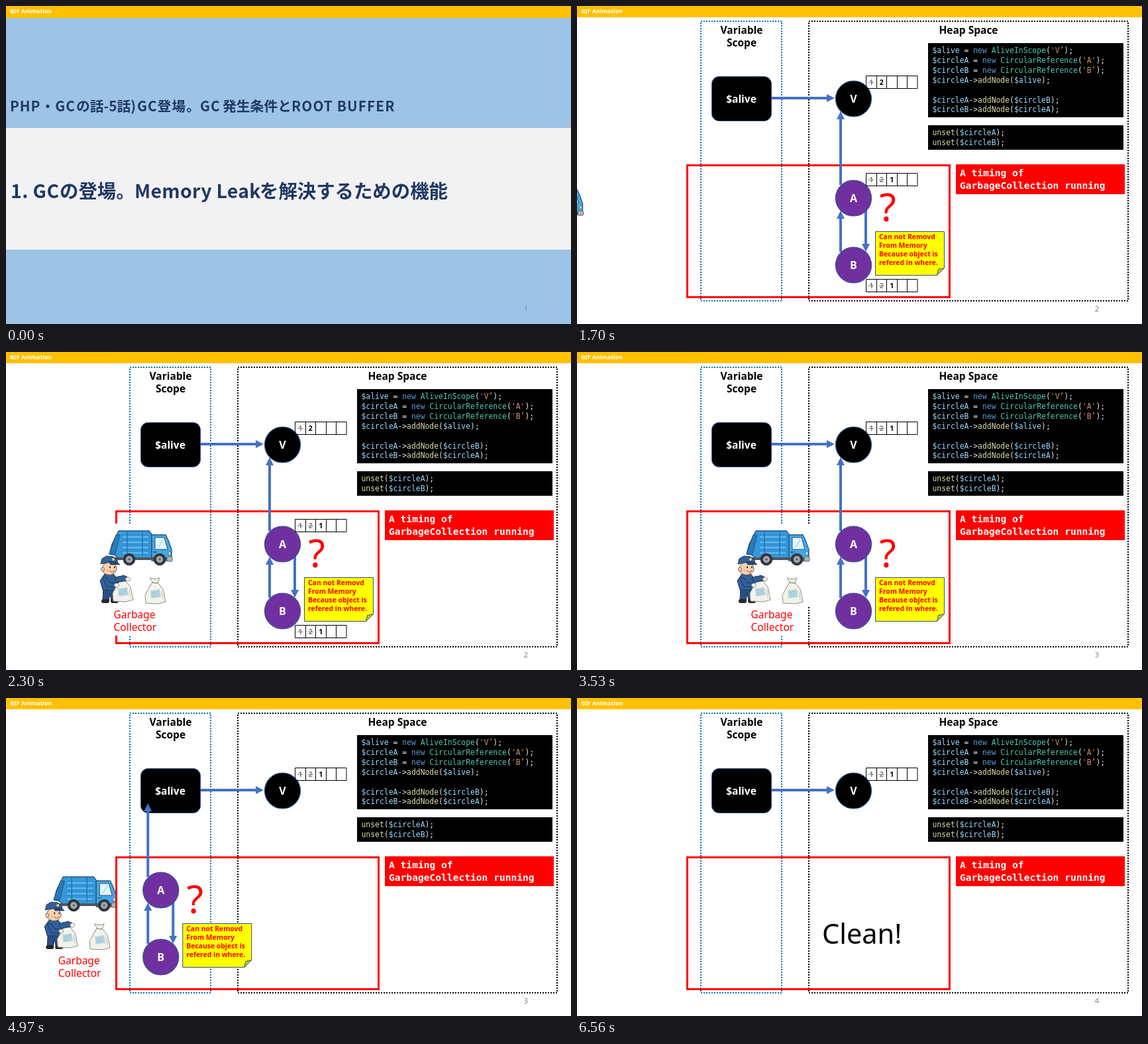
An HTML page with a canvas that plays this animation: 853x480 px, repeating every 8 s.

```html
<!DOCTYPE html>
<html lang="ja">
<head>
<meta charset="utf-8">
<title>GC Animation</title>
<style>
  html, body { margin: 0; width: 100%; height: 100%; overflow: hidden; background: #fff; }
  canvas { display: block; width: 853px; height: 480px; }
</style>
</head>
<body>
<canvas id="stage" width="853" height="480"></canvas>
<script>
const ctx = document.getElementById('stage').getContext('2d');
const SANS = '"Noto Sans", "Open Sans", sans-serif';
const CJK = '"Noto Sans CJK JP", "Noto Sans CJK", sans-serif';
const MONO = '"DejaVu Sans Mono", monospace';
const LOOP = 8000, STEP = 60;
const BLUE = '#4472c4', EDGE = '#2f528f', RED = '#ff0000', PURPLE = '#7030a0', NAVY = '#1f3864';

function text(str, x, y, font, color, align = 'left') {
  ctx.font = font;
  ctx.fillStyle = color;
  ctx.textAlign = align;
  ctx.fillText(str, x, y);
}

function rect(x, y, w, h, color) {
  ctx.fillStyle = color;
  ctx.fillRect(x, y, w, h);
}

function paint(fill, stroke, width = 1) {
  if (fill) { ctx.fillStyle = fill; ctx.fill(); }
  if (stroke) { ctx.strokeStyle = stroke; ctx.lineWidth = width; ctx.stroke(); }
}

function poly(points, fill, stroke, width) {
  ctx.beginPath();
  points.forEach(([x, y]) => ctx.lineTo(x, y));
  ctx.closePath();
  paint(fill, stroke, width);
}

function oval(x, y, rx, ry, fill, stroke, width) {
  ctx.beginPath();
  ctx.ellipse(x, y, rx, ry, 0, 0, Math.PI * 2);
  paint(fill, stroke, width);
}

function rounded(x, y, w, h, r, fill, stroke, width) {
  ctx.beginPath();
  ctx.roundRect(x, y, w, h, r);
  paint(fill, stroke, width);
}

function line(x1, y1, x2, y2, color, width) {
  ctx.beginPath();
  ctx.moveTo(x1, y1);
  ctx.lineTo(x2, y2);
  paint(null, color, width);
}

function dotted(x, y, w, h, color) {
  ctx.setLineDash([2, 2]);
  ctx.strokeStyle = color;
  ctx.lineWidth = 2;
  ctx.strokeRect(x, y, w, h);
  ctx.setLineDash([]);
}

function arrow(x1, y1, x2, y2) {
  const len = Math.hypot(x2 - x1, y2 - y1);
  ctx.save();
  ctx.translate(x1, y1);
  ctx.rotate(Math.atan2(y2 - y1, x2 - x1));
  line(0, 0, len - 10, 0, BLUE, 4);
  poly([[len - 12, -6], [len, 0], [len - 12, 6]], BLUE);
  ctx.restore();
}

function node(label, x, y, color) {
  oval(x, y, 27, 27, color, EDGE, 1.2);
  text(label, x, y + 6, `bold 16px ${SANS}`, '#fff', 'center');
}

// Five cells of reference counts; only the last value is current.
function counts(y, values) {
  const x = 436.5, cell = 15.5;
  ctx.beginPath();
  ctx.rect(x, y + 0.5, cell * 5, 19);
  for (let i = 1; i < 5; i++) {
    const cx = Math.floor(x + cell * i) + 0.5;
    ctx.moveTo(cx, y + 0.5);
    ctx.lineTo(cx, y + 19.5);
  }
  paint(null, '#000', 1);
  values.forEach((v, i) => {
    const old = i < values.length - 1, cx = x + cell * (i + 0.5);
    text(v, cx, y + 14, `bold 10.5px ${SANS}`, old ? '#7f7f7f' : '#000', 'center');
    if (old) line(cx - 4, y + 10.5, cx + 4, y + 10.5, '#7f7f7f', 1);
  });
}

const TOKEN = /(\$\w+)|(new\b)|('.['’])|([A-Z]\w+)|(\w+)|(.)/g;
const TOKEN_COLORS = ['#9cdcfe', '#569cd6', '#ce9178', '#4ec9b0', '#dcdcaa', '#e6e6e6'];

function code(lines, x, y) {
  ctx.font = `11.4px ${MONO}`;
  const advance = ctx.measureText('0').width;
  lines.forEach((src, row) => {
    for (const m of src.matchAll(TOKEN)) {
      const kind = m.slice(1).findIndex(Boolean);
      text(m[0], x + m.index * advance, y + row * 14.9, `11.4px ${MONO}`, TOKEN_COLORS[kind]);
    }
  });
}

function titleSlide() {
  rect(0, 0, 853, 480, '#9dc3e6');
  rect(0, 184, 853, 184, '#f2f2f2');
  rect(0, 368, 853, 1, '#8fb6da');
  const runs = (list, y, size) => list.forEach(([str, x, spacing = 0]) => {
    ctx.letterSpacing = spacing + 'px';
    text(str, x, y, `bold ${size}px ${CJK}`, NAVY);
  });
  runs([['PHP・GC', 6, 1], ['の話-5話)', 106], ['GC登場。', 198, 1], ['GC', 293, 1],
    ['発生条件と', 327], ['ROOT BUFFER', 431, 1.1]], 159, 20.8);
  runs([['1. GC', 7, 0.4], ['の登場。', 81], ['Memory Leak', 194, 0.3],
    ['を解決するための機能', 383]], 290, 28.4);
  ctx.letterSpacing = '0px';
  text('1', 785, 461, `10.5px ${SANS}`, '#6f8fb0', 'center');
}

function header(height) {
  rect(0, 0, 853, height, '#ffc000');
  text('GIF Animation', 6, 11, `bold 8.8px ${SANS}`, '#fff');
}

function diagram(page) {
  const heading = `bold 15.5px ${SANS}`;
  dotted(187, 23, 122, 422, '#0070c0');
  dotted(350, 23, 482, 422, '#000');
  text('Variable', 248.5, 42, heading, '#000', 'center');
  text('Scope', 248.5, 61, heading, '#000', 'center');
  text('Heap Space', 591, 42, heading, '#000', 'center');
  rect(530, 56, 295, 112, '#000');
  code(["$alive = new AliveInScope('V’);", "$circleA = new CircularReference('A');",
    "$circleB = new CircularReference('B’);", '$circleA->addNode($alive);', '',
    '$circleA->addNode($circleB);', '$circleB->addNode($circleA);'], 536.5, 71);
  rect(530, 180, 295, 37, '#000');
  code(['unset($circleA);', 'unset($circleB);'], 536.5, 195);
  rect(572, 239, 255, 45, RED);
  text('A timing of', 578, 257, `bold 14.6px ${MONO}`, '#fff');
  text('GarbageCollection running', 578, 276, `bold 14.6px ${MONO}`, '#fff');
  rounded(203.5, 106.5, 90, 67, 11, '#000', EDGE);
  text('$alive', 248, 146, heading, '#fff', 'center');
  node('V', 417.5, 140, '#000');
  arrow(294, 139, 389, 139);
  counts(105, page === 2 ? ['1', '2'] : ['1', '2', '1']);
  text(page, 785, 461, `11px ${SANS}`, '#7f7f7f', 'center');
}

function redFrame() {
  ctx.strokeStyle = RED;
  ctx.lineWidth = 3;
  ctx.strokeRect(166.5, 240.5, 396, 199);
}

function cycle() {
  arrow(398, 270, 398, 159);
  arrow(398, 371, 398, 309);
  arrow(436, 307, 436, 371);
  node('A', 417.5, 290, PURPLE);
  node('B', 417.5, 391, PURPLE);
  text('?', 469, 325, `58px ${SANS}`, RED, 'center');
  poly([[450.5, 340.5], [554.5, 340.5], [554.5, 395.5], [543.5, 406.5], [450.5, 406.5]], '#ffff00', EDGE);
  poly([[543.5, 406.5], [545.5, 397.5], [554.5, 395.5]], '#cdcd00', EDGE);
  ['Can not Removd', 'From Memory', 'Because object is', 'refered in where.'].forEach((str, i) =>
    text(str, 456, 352 + i * 13, `bold 10.4px ${SANS}`, RED));
}

function wheel(x) {
  oval(x, 313, 9.3, 9.3, '#30343c');
  oval(x, 313, 5.2, 5.2, '#a9aaae', '#6c6f76');
  oval(x, 313, 1.8, 1.8, '#5b5e66');
}

function truck() {
  const ink = '#28537f';
  poly([[270, 270], [316, 270], [320, 275], [320, 313], [272, 313], [263, 306], [256, 305], [260, 290]],
    '#3499dc', ink, 1.3);
  poly([[266, 276], [272, 276], [265, 305], [256, 304]], '#257db8', ink);
  for (const y of [277, 285, 293, 301]) {
    rounded(275, y, 41, 4.5, 1, '#55b4ee', '#2477b5', 0.8);
  }
  line(283, 271, 283, 308, '#2471ad', 1.5);
  line(306, 271, 306, 308, '#2471ad', 1.5);
  poly([[320, 276], [341, 276], [345, 284], [350, 298], [350, 315], [320, 315]], '#40a9e8', ink, 1.3);
  poly([[325, 280], [339, 280], [344, 298], [325, 298]], '#e5f5fd', ink);
  line(330, 295, 337, 283, '#b5def4', 2);
  line(322, 302, 328, 302, ink, 1.5);
  rect(262, 310, 84, 4, '#50555e');
  rounded(343, 309, 8, 7, 1.5, '#a9b4bd', '#59636d');
  oval(347, 304, 2, 2.5, '#fff1b8', ink, 0.7);
  wheel(286);
  wheel(332);
}

function bag(x, y) {
  poly([[x - 4, y - 14], [x - 8, y - 20], [x, y - 18], [x + 7, y - 20], [x + 4, y - 13],
    [x + 12, y - 3], [x + 16, y + 16], [x + 5, y + 19], [x - 14, y + 18], [x - 15, y + 6]],
    '#f4f2e9', '#8f8d84');
  line(x - 5, y - 13, x + 5, y - 12, '#9d9a8d', 1.4);
  poly([[x - 7, y - 1], [x + 7, y - 3], [x + 9, y + 9], [x - 6, y + 11]], '#b9d9e5');
  for (let i = 0; i < 3; i++) line(x - 5, y + 2 + i * 3, x + 6, y + i * 3, '#8bbacb', 0.8);
  line(x + 10, y, x + 12, y + 13, '#c9c6b9', 1);
}

function worker() {
  const suit = '#30609a', ink = '#1e3555', skin = '#f8d2af';
  poly([[247, 354], [266, 354], [268, 375], [259, 375], [257, 364], [255, 376], [246, 376]], '#294f82', ink);
  rounded(244, 373, 12, 6, 3, '#25272e');
  rounded(258, 373, 12, 6, 3, '#25272e');
  poly([[249, 335], [262, 335], [269, 343], [267, 359], [246, 359], [242, 345]], suit, ink);
  oval(256, 327, 11, 9.5, skin, '#6e4c3b', 0.9);
  oval(246, 328, 2.5, 3, skin, '#6e4c3b', 0.8);
  poly([[243, 320], [245, 312], [252, 308], [262, 309], [268, 314], [268, 318], [257, 317]], suit, ink);
  poly([[255, 317], [268, 317], [272, 321], [258, 321]], '#234875', ink, 0.7);
  oval(262, 313, 2, 2, '#f4d35c');
  oval(257, 325, 1, 1.4, '#222');
  oval(264, 325, 1, 1.4, '#222');
  oval(253, 330, 2, 1.2, '#f3ab98');
  ctx.beginPath();
  ctx.arc(260, 328, 4, 0.3, 2.7);
  paint(null, '#8c3f34', 1);
  bag(276, 358);
  poly([[246, 341], [251, 340], [257, 348], [265, 349], [264, 355], [252, 354]], suit, ink);
  oval(267, 352, 3.5, 3, '#fff', '#777', 0.8);
  poly([[264, 341], [278, 337], [284, 341], [282, 345], [267, 348]], suit, ink);
  oval(284, 343, 3.5, 3, '#fff', '#777', 0.8);
  bag(325, 361);
}

function collector() {
  rect(237, 259, 114.5, 125, '#fff');
  rect(256, 384, 80, 44, '#fff');
  truck();
  worker();
  text('Garbage', 262.5, 402, `15.5px ${SANS}`, RED);
  text('Collector', 262.5, 421, `15.5px ${SANS}`, RED);
}

function shifted(dx, draw) {
  ctx.save();
  ctx.translate(dx, 0);
  draw();
  ctx.restore();
}

const stepsSince = (t, start) => Math.floor((t - start) / STEP);

function arrivalSlide(t) {
  diagram(2);
  redFrame();
  cycle();
  counts(252, ['1', '2', '1']);
  counts(412, ['1', '2', '1']);
  const step = stepsSince(t, 1700);
  if (step >= 0) shifted(Math.min(0, 24.15 * step - 341.5), collector);
}

function departureSlide(t) {
  diagram(3);
  const dx = -36.75 * Math.max(0, stepsSince(t, 4730) + 1);
  shifted(dx, collector);
  redFrame();
  shifted(dx, cycle);
}

function cleanSlide() {
  diagram(4);
  redFrame();
  text('Clean!', 370, 371, `41.5px ${SANS}`, '#000');
}

function render(now) {
  const t = now % LOOP;
  rect(0, 0, 853, 480, '#fff');
  if (t < 500) titleSlide();
  else if (t < 3530) arrivalSlide(t);
  else if (t < 6560) departureSlide(t);
  else cleanSlide();
  header(t < 500 ? 18 : 17);
}

let start;
function tick(now) {
  start ??= now;
  render(now - start);
  requestAnimationFrame(tick);
}
render(0);
requestAnimationFrame(tick);
</script>
</body>
</html>
```
